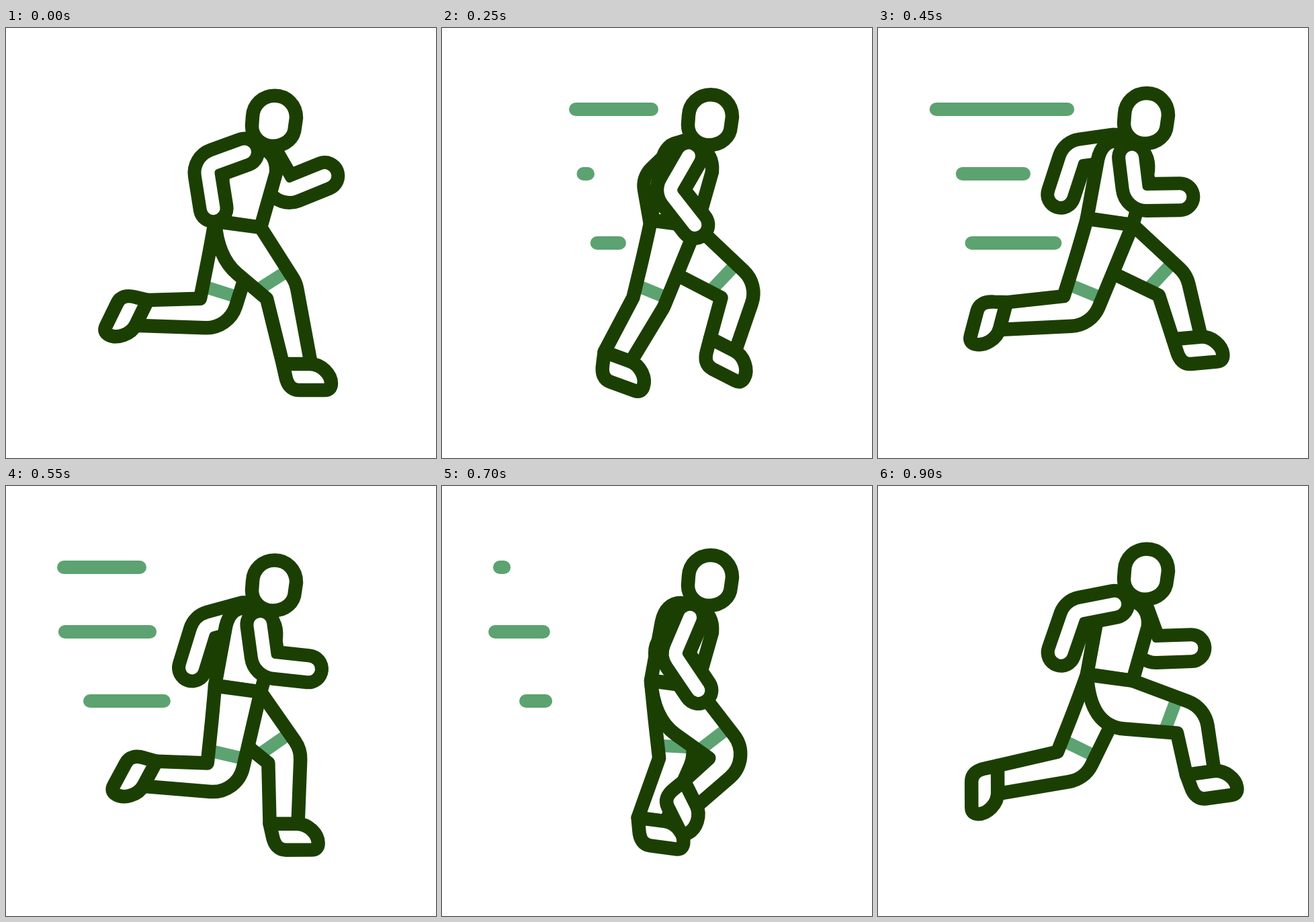
Write an HTML page with a canvas that moves like this. It is 640 px wide and 640 px high and loops after 0.95 s.

```html
<!DOCTYPE html>
<html lang="en">
<head>
<meta charset="utf-8">
<title>Runner</title>
<style>
  html, body { margin: 0; width: 100%; height: 100%; overflow: hidden; background: #fff; }
  canvas { display: block; width: 100vmin; height: 100vmin; }
</style>
</head>
<body>
<canvas id="stage" width="640" height="640"></canvas>
<script>
const ctx = document.getElementById('stage').getContext('2d');
const DARK = '#1b3f03', GREEN = '#5ca371', WHITE = '#fff';
const STEP = 50, STEPS = 19, LINE = 20.5, RAD = Math.PI / 180;

// Stride key poses: phase, knee x, heel x, heel y, foot angle
const STRIDE = [
  [0, 388, 412, 500, 0],
  [2, 388, 382, 500, 0],
  [4.2, 325, 294, 494, 7],
  [5.2, 285, 243, 483, 19],
  [8.5, 267, 178, 416, 90],
  [9.5, 289, 211, 405, 116],
  [11.5, 308, 234, 413, 116],
  [12, 345, 281, 420, 104],
  [13.7, 396, 358, 438, 65],
  [14.7, 415, 398, 462, 28],
  [18, 445, 459, 430, -8]
];

// Arm swing: step, upper arm angle, forearm angle (0 hangs down, + is forward)
const NEAR_SWING = [
  [0, -70, 9], [2, -57, 16], [5, -30, 38], [9, 7, 91], [12, 3, 73], [14, -23, 34], [18, -79, -19]
];
const FAR_SWING = [
  [0, 30, 112], [2, 24, 104], [5, -46, 10], [9, -82, -18], [12, -65, -12], [14, -31, 14], [18, 20, 92]
];

// Speed lines: height, right end, left end, first step
const STREAKS = [[121, 312, 86, 0.7], [217, 217, 79, 3.8], [320, 264, 125, 2.2]];

const mix = (a, b, k) => a + (b - a) * k;
const mixPt = (a, b, k) => [mix(a[0], b[0], k), mix(a[1], b[1], k)];
const ease = k => (1 - Math.cos(Math.PI * Math.min(1, Math.max(0, k)))) / 2;
const hang = ([x, y], deg, len) => [x + len * Math.sin(deg * RAD), y + len * Math.cos(deg * RAD)];
const lean = (a, b) => Math.atan2(b[0] - a[0], b[1] - a[1]) / RAD;

// Smooth periodic interpolation through rows of [time, ...values]
function spline(rows, t) {
  const n = rows.length;
  t = (t % STEPS + STEPS) % STEPS;
  let i = n - 1;
  while (i > 0 && rows[i][0] > t) i--;
  const row = j => rows[(j + n) % n];
  const time = j => row(j)[0] + STEPS * Math.floor(j / n);
  const h = time(i + 1) - time(i), k = (t - time(i)) / h;
  const slope = (j, c) => (row(j + 1)[c] - row(j - 1)[c]) / (time(j + 1) - time(j - 1)) * h;
  return row(i).slice(1).map((a, j) => {
    const c = j + 1, b = row(i + 1)[c], k2 = k * k, k3 = k2 * k;
    return a * (2 * k3 - 3 * k2 + 1) + slope(i, c) * (k3 - 2 * k2 + k)
      + b * (3 * k2 - 2 * k3) + slope(i + 1, c) * (k3 - k2);
  });
}

function stroke(path, color = DARK, width = LINE, cap = 'round') {
  ctx.strokeStyle = color;
  ctx.lineWidth = width;
  ctx.lineCap = cap;
  ctx.stroke(path);
}

function fill(path) {
  ctx.fillStyle = WHITE;
  ctx.fill(path);
}

function shape(path, x, y, angle = 0) {
  ctx.save();
  ctx.translate(x, y);
  ctx.rotate(angle);
  fill(path);
  stroke(path);
  ctx.restore();
}

function segment(a, b) {
  const p = new Path2D();
  p.moveTo(...a);
  p.lineTo(...b);
  return p;
}

const SHOE = new Path2D('M0 0H40C58 0 72 16 72 29Q72 39 62 39H24Q8 39 4 18Z');
const HEAD = new Path2D('M432 134C432 115 418 101 400 101C382 101 368 114 367 132L366 146' +
  'C366 163 380 176 397 176C416 176 429 164 430 148Z');
const TORSO = new Path2D('M311 287L327 200Q333 172 356 172L384 180Q404 190 402 216L379 297Z');

function leg(phase, dy, near) {
  const [kx, ax, ay, deg] = spline(STRIDE, phase);
  const back = [311, 288 + dy], front = [379, 297 + dy];
  // The knee stays level with the hips until it swings far forward
  const knee = [kx, 403 + dy - Math.max(0, kx - 417)], heel = [ax, ay];
  const a = deg * RAD;
  const instep = [ax + 42 * Math.cos(a), ay + 42 * Math.sin(a)];

  // The kneecap lies across the joint, further out as the knee bends
  const upper = lean([345, 290 + dy], knee), lower = lean(knee, heel);
  const cap = hang(knee, (upper + lower) / 2 + 101, 48 + 0.22 * (upper - lower));

  const swing = kx - 310, ahead = Math.max(0, swing);
  const seat = [back[0] + (swing < 0 ? swing * 0.35 : 4), back[1] + 42 + 0.0019 * ahead * ahead];
  const thigh = mixPt(seat, knee, 0.4);

  const rear = p => {
    p.moveTo(...back);
    p.quadraticCurveTo(...seat, ...thigh);
    p.lineTo(...knee);
    p.lineTo(...heel);
  };
  const body = new Path2D();
  rear(body);
  body.lineTo(...instep);
  body.arcTo(...cap, ...front, 46);
  body.lineTo(...front);
  fill(body);

  // Band square to the front of the thigh, just above the knee
  const from = mixPt(knee, seat, 19 / Math.hypot(seat[0] - knee[0], seat[1] - knee[1]));
  const vx = cap[0] - front[0], vy = cap[1] - front[1], len = Math.hypot(vx, vy);
  const along = ((from[0] - front[0]) * vx + (from[1] - front[1]) * vy) / len;
  const to = mixPt(front, cap, Math.min(along, len - 12) / len);
  stroke(segment(from, to), GREEN, 19, 'butt');

  const outline = new Path2D();
  rear(outline);
  outline.moveTo(...front);
  outline.arcTo(...cap, ...instep, 46);
  outline.lineTo(...instep);
  stroke(outline);
  if (near) stroke(segment(back, front));
  shape(SHOE, ax, ay, a);
}

function arm(swing, f, dy) {
  const [upper, fore] = spline(swing, f);
  const shoulder = [376 + 0.3 * upper, 198 - 0.19 * Math.abs(upper) + dy];
  const elbow = hang(shoulder, upper, 60);
  const hand = hang(elbow, fore, 64);
  const p = new Path2D();
  p.moveTo(...shoulder);
  p.arcTo(...elbow, ...hand, 16);
  p.lineTo(...hand);
  stroke(p, DARK, 60);
  stroke(p, WHITE, 20);
}

function draw(f) {
  ctx.fillStyle = WHITE;
  ctx.fillRect(0, 0, 640, 640);
  ctx.lineJoin = 'round';

  for (const [y, right, left, first] of STREAKS) {
    const head = mix(right, left, ease((f - first) / 8.6));
    const tail = mix(right, left, ease((f - first - 6.5) / 7.6));
    if (tail - head > 0.5) stroke(segment([head, y], [tail, y]), GREEN, 20);
  }

  const turn = 2 * Math.PI / STEPS;
  const dy = 11.5 * Math.cos(2 * turn * (f - 2.4));
  const phase = f + 0.25 * Math.sin(turn * f) ** 3;
  arm(FAR_SWING, f, dy);
  leg(phase + STEPS / 2, dy, false);
  shape(TORSO, 0, dy);
  leg(phase, dy, true);
  arm(NEAR_SWING, f, dy);
  shape(HEAD, 0, dy);
}

const start = performance.now();
function tick() {
  draw(Math.floor((performance.now() - start) / STEP) % STEPS);
  requestAnimationFrame(tick);
}
tick();
</script>
</body>
</html>
```
